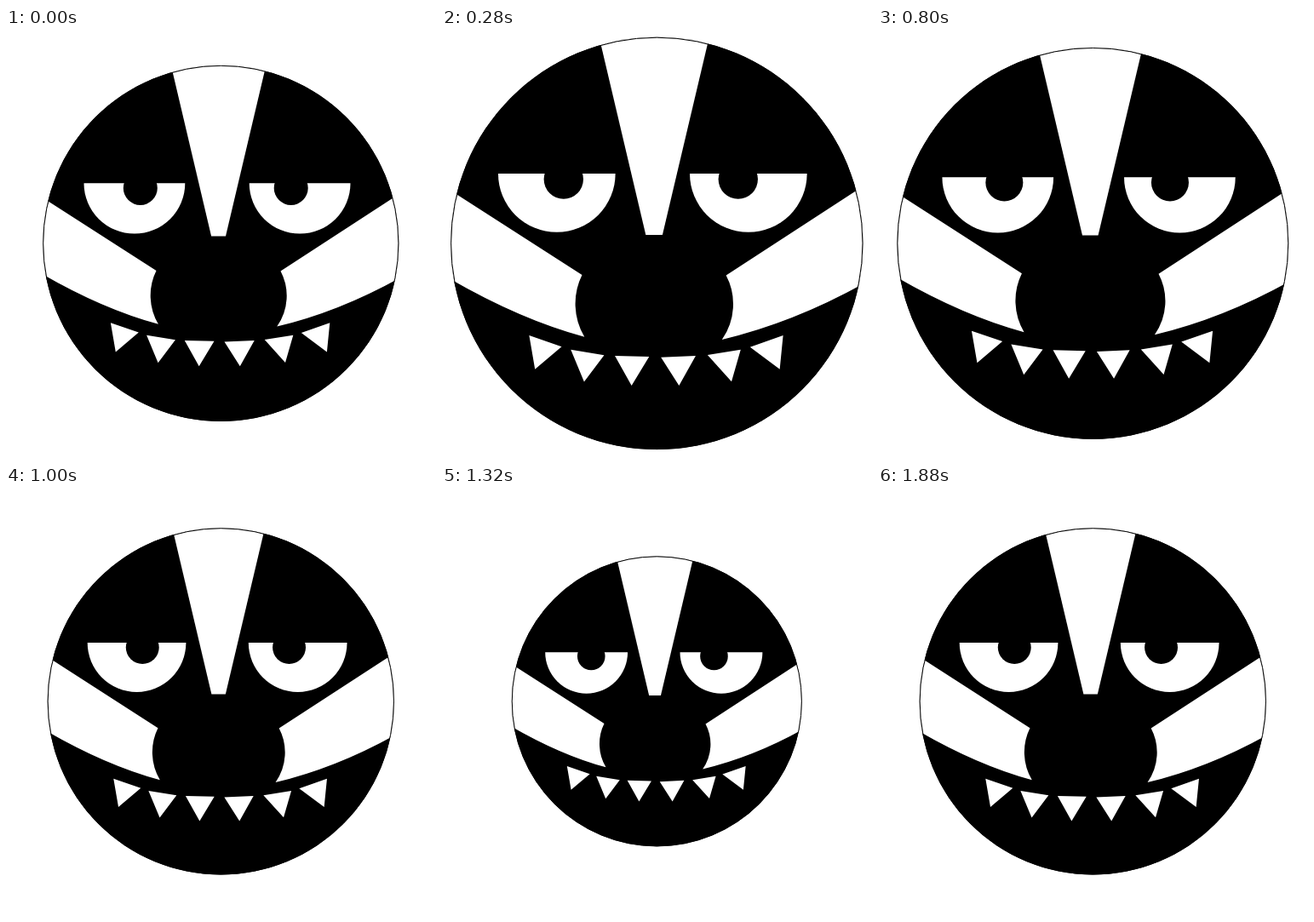
An HTML page for the animation above (1920 ms loop, 505 px wide and 505 px high).

```html
<!DOCTYPE html>
<html lang="en">
<head>
<meta charset="utf-8">
<title>Pulsing face</title>
<style>
  @property --phase {
    syntax: "<angle>";
    inherits: false;
    initial-value: 0deg;
  }
  html, body {
    margin: 0;
    width: 100%;
    height: 100%;
    overflow: hidden;
    background: #fff;
  }
  svg {
    display: block;
    width: 100vw;
    height: 100vh;
  }
  /* Sine pulse of 20 %, held for 40 ms per step */
  .face {
    transform-origin: 252.3px 252.9px;
    transform: scale(calc(1 + 0.2 * sin(var(--phase))));
    animation: pulse 1920ms steps(48, end) infinite;
  }
  @keyframes pulse {
    from { --phase: 0deg; }
    to { --phase: 360deg; }
  }
  .white { fill: #fff; }
  .rim {
    fill: none;
    stroke: #000;
    stroke-width: 1;
    vector-effect: non-scaling-stroke;
  }
</style>
</head>
<body>
<svg viewBox="0 0 505 505">
  <defs>
    <clipPath id="disc"><circle cx="252.3" cy="252.9" r="209"/></clipPath>
    <path id="eye" d="M-59.4 0H59.4A59.4 59.4 0 0 1 -59.4 0Z"/>
  </defs>
  <g class="face">
    <circle cx="252.3" cy="252.9" r="209"/>
    <g class="white" clip-path="url(#disc)">
      <!-- forehead stripe -->
      <path d="M192.9 40H306.3L258 244.4H241.1Z"/>
      <!-- cheeks -->
      <path d="M40 197.2L176.5 285A66 66 0 0 0 178.9 347.8Q113 330 40 287.5Z"/>
      <path d="M465 192.7L322.5 285.4A62.5 62.5 0 0 1 318.3 350.5Q392 333 465 292Z"/>
    </g>
    <g class="white">
      <use href="#eye" x="150.9" y="182.2"/>
      <use href="#eye" x="345.1" y="182.2"/>
      <!-- teeth -->
      <path d="M122.9 346.3L155.8 357.6L128.8 380.4Z
               M165.1 360.7L198.9 366.2L178.6 393.2Z
               M209.8 366.9L244.5 367.8L226.7 397.2Z
               M256.5 368.5L291.7 366.9L274.8 397.2Z
               M303.7 366.1L337.3 360.7L328 393Z
               M346.8 358L380.3 346.3L376.9 380.4Z"/>
    </g>
    <!-- pupils -->
    <circle cx="157.8" cy="187.9" r="20"/>
    <circle cx="334.7" cy="187.9" r="20"/>
    <circle class="rim" cx="252.3" cy="252.9" r="208.6"/>
  </g>
</svg>
</body>
</html>
```
